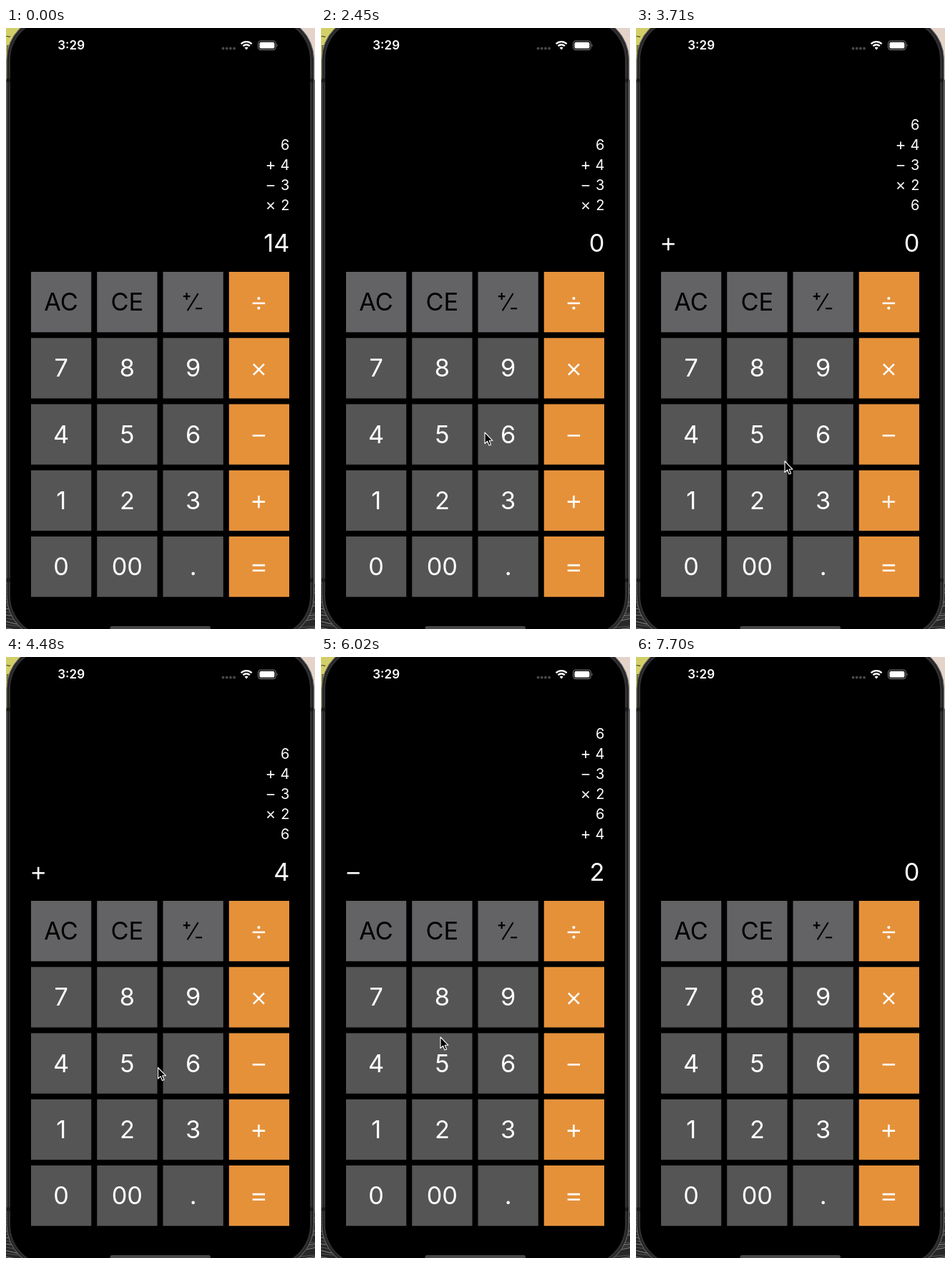
Write an HTML page that moves like this. It is 432 px wide and 838 px high and loops after 7.77 s.

```html
<!DOCTYPE html>
<html lang="en">
<head>
<meta charset="utf-8">
<title>Calculator</title>
<style>
  html, body { margin: 0; width: 100%; height: 100%; overflow: hidden; background: #000; }
  svg { display: block; width: 432px; height: 838px; font-family: Inter, "Open Sans", sans-serif; }
  .big { font-size: 34.3px; }
  .row { font-size: 20px; }
</style>
</head>
<body>
<svg id="stage" viewBox="0 0 432 838" xmlns="http://www.w3.org/2000/svg">
  <rect width="432" height="838" fill="#59595a"/>
  <rect width="40" height="72" fill="#d3cf68"/>
  <rect x="392" width="40" height="72" fill="#e4d3c8"/>
  <g font-family="'DejaVu Sans Mono', monospace" font-size="11" fill="#222">
    <text x="0" y="16">~</text><text x="-1" y="32">[</text>
  </g>
  <g id="ground"></g>
  <rect x="1" y="-16" width="429.5" height="868" rx="60" fill="#303032" stroke="#6b6b6d"/>
  <rect x="3" y="-14" width="425.5" height="864" rx="58" fill="none" stroke="#1d1d1f"/>
  <path d="M1 73h5M425 73h5M1 770h5M425 770h5" stroke="#1a1a1b" stroke-width="5"/>
  <rect x="6" y="-11" width="419" height="858" rx="55"/>

  <text x="72.3" y="30" font-size="17" font-weight="600" fill="#fff">3:29</text>
  <g id="signal" fill="#48484a"></g>
  <g fill="none" stroke="#fff" stroke-width="2.4">
    <path d="M328.6 22.2a10.8 10.8 0 0 1 15 0"/>
    <path d="M331.4 25.2a6.8 6.8 0 0 1 9.4 0"/>
    <path d="M333.6 27.6a3.8 3.8 0 0 1 5 0l-2.5 2.8z" fill="#fff" stroke="none"/>
  </g>
  <rect x="352.6" y="18" width="24.6" height="12.4" rx="3.6" fill="none" stroke="#77777a" stroke-width="1.1"/>
  <rect x="354.4" y="19.8" width="21" height="8.8" rx="2.2" fill="#fff"/>
  <path d="M378.6 22.2a2.4 2.4 0 0 1 0 4z" fill="#77777a"/>

  <g id="keys"></g>
  <g id="display" fill="#fff"></g>
  <rect x="145.5" y="834" width="140.5" height="5.4" rx="2.7" fill="#48484a"/>
  <path id="cursor" d="M0 0V15.5L3.6 12.2 6 18 8.6 17 6.2 11.3H11Z" fill="#000" stroke="#fff" stroke-width="1.1" stroke-linejoin="round"/>
</svg>
<script>
const LOOP = 7770, STEP = 70, HOLD = 140, FADE = 250;
const PITCH = 92.25, SIZE = 84.25, LINE = 28;
const OPS = '÷×−+=';
const $ = id => document.getElementById(id);
const repeat = (n, make) => Array.from({ length: n }, (_, i) => make(i)).join('');

// Operator sign centred at (x, y) with half width r.
function sign(op, x, y, r, w, color = '#fff') {
  const d = r * 0.86;
  const bar = dy => `M${x - r} ${y + dy}h${2 * r}`;
  const shape = {
    '+': bar(0) + `M${x} ${y - r}v${2 * r}`,
    '−': bar(0),
    '=': bar(-r * 0.42) + bar(r * 0.42),
    '×': `M${x - d} ${y - d}l${2 * d} ${2 * d}M${x + d} ${y - d}l${-2 * d} ${2 * d}`,
    '÷': bar(0)
  }[op];
  const dot = s => `<circle cx="${x}" cy="${y + s * r * 0.78}" r="${w * 0.8}" fill="${color}"/>`;
  return `<path d="${shape}" fill="none" stroke="${color}" stroke-width="${w}"/>` +
    (op === '÷' ? dot(-1) + dot(1) : '');
}

function label(key, x, y, color) {
  if (OPS.includes(key)) return sign(key, x - 0.5, y + 1.7, 8.7, 2.6);
  if (key === '±') {
    return sign('+', x - 9, y - 8, 4.8, 2.2, color) + sign('−', x + 8, y + 9, 4.5, 2.2, color) +
      `<path d="M${x - 8} ${y + 12}l15 -24" stroke="${color}" stroke-width="2"/>`;
  }
  return `<text class="big" x="${x}" y="${y + 12.1}" text-anchor="middle" fill="${color}">${key}</text>`;
}

const labels = {};
$('keys').innerHTML = 'AC CE ± ÷ 7 8 9 × 4 5 6 − 1 2 3 + 0 00 . ='.split(' ').map((key, i) => {
  const x = 35 + i % 4 * PITCH, y = 340 + Math.floor(i / 4) * PITCH;
  const fill = OPS.includes(key) ? '#e5913a' : i < 4 ? '#636365' : '#555556';
  return `<rect x="${x}" y="${y}" width="${SIZE}" height="${SIZE}" fill="${fill}"/>` +
    `<g data-key="${key}">${label(key, x + SIZE / 2, y + SIZE / 2, i < 4 ? '#000' : '#fff')}</g>`;
}).join('');
document.querySelectorAll('[data-key]').forEach(g => labels[g.dataset.key] = g);

$('signal').innerHTML = repeat(4, i => `<circle cx="${303.5 + i * 5.2}" cy="28.5" r="1.9"/>`);
$('ground').innerHTML = '<path d="M0 775h432v63H0z" fill="#272727"/>' + repeat(14, i => {
  const y = 778 + i * 4.5;
  return `<path d="M0 ${y}l45 ${5 + i % 3 * 3}M387 ${y + 6}l45 ${-4 - i % 4 * 2}" stroke="${i % 2 ? '#8b8884' : '#555'}"/>`;
});

// Where the pointer goes: time, x, y and the key let go there, if any.
const route = [
  [0, 436, 862], [420, 164, 525], [980, 315, 575], [1470, 200, 411],
  [2030, 178, 391, 'CE'], [2450, 229, 564], [2940, 256, 596, '6'], [3500, 348, 652, '+'],
  [3710, 208, 604], [4200, 80, 578, '4'], [4900, 345, 567, '−'], [5180, 211, 644],
  [5670, 199, 648, '2'], [6020, 167, 530], [6650, 93, 382, 'AC'], [7490, 228, 837], [7560, 234, 862]
];
const clicks = route.filter(p => p[3]);
const path = route.flatMap(p => p[3] ? [[p[0] - HOLD, p[1], p[2]], p] : [p]);

// Speed of coordinate k at a point: none where it rests or turns.
function speed(i, k) {
  const b = path[i], a = path[i - 1] || b, c = path[i + 1] || b;
  const inner = a !== b && c !== b;
  if (inner && (b[k] - a[k]) * (c[k] - b[k]) <= 0) return 0;
  return (c[k] - a[k]) / (c[0] - a[0]);
}

// Smooth curve through the path.
function along(t, k) {
  const i = path.findLastIndex((p, n) => p[0] <= t && n < path.length - 1);
  const a = path[i], b = path[i + 1], h = b[0] - a[0];
  const u = Math.min(1, (t - a[0]) / h), v = 1 - u;
  return a[k] + (b[k] - a[k]) * u * u * (3 - 2 * u) +
    h * u * v * (speed(i, k) * v - speed(i + 1, k) * u);
}

function press(s, key) {
  if (key === 'AC') return { value: '0', op: '', tape: [] };
  if (key === 'CE') return { ...s, value: '0' };
  if (OPS.includes(key)) return { value: '0', op: key, tape: [...s.tape, s.op + s.value] };
  return { ...s, value: s.value === '0' ? key : s.value + key };
}

function display({ value, op, tape }) {
  const lines = tape.map((line, i) => {
    const y = 254 - (tape.length - 1 - i) * LINE;
    return `<text class="row" x="396.4" y="${y}" text-anchor="end">${line.slice(-1)}</text>` +
      (line.length > 1 ? sign(line[0], 370, y - 6.2, 5.3, 1.7) : '');
  });
  return `<text class="big" x="396.3" y="312" text-anchor="end">${value}</text>` +
    (op ? sign(op, 45.2, 301.3, 8.6, 2.6) : '') + lines.join('');
}

function draw(t) {
  let state = { value: '14', op: '', tape: ['6', '+4', '−3', '×2'] };
  for (const [up, , , key] of clicks) {
    if (t >= up) state = press(state, key);
    const fade = Math.min(1, Math.max(0, (t - up) / FADE));
    labels[key].setAttribute('opacity', t < up - HOLD ? 1 : 0.25 + 0.75 * fade);
  }
  $('display').innerHTML = display(state);
  $('cursor').setAttribute('transform', `translate(${along(t, 1).toFixed(1)} ${along(t, 2).toFixed(1)})`);
}

const start = performance.now();
function tick() {
  const t = (performance.now() - start) % LOOP;
  draw(Math.floor(t / STEP) * STEP);
  requestAnimationFrame(tick);
}
tick();
</script>
</body>
</html>
```
